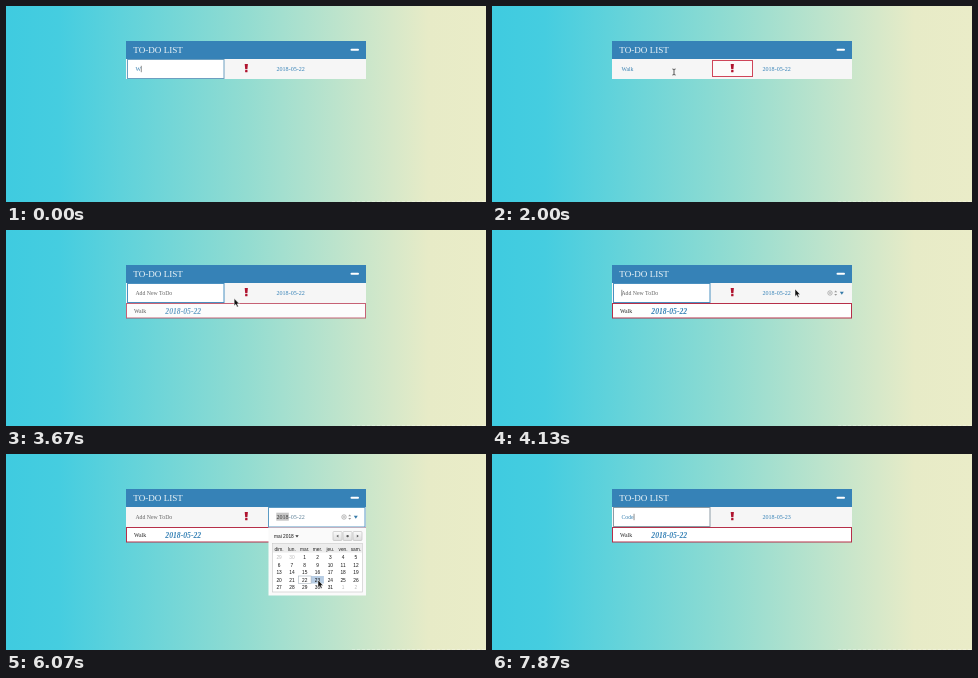
An HTML page for the animation above (8 s loop, 480 by 196 pixels).

```html
<!DOCTYPE html>
<html lang="en">
<head>
<meta charset="utf-8">
<title>To-do list</title>
<style>
html, body { margin: 0; width: 100%; height: 100%; overflow: hidden; }
svg { display: block; width: 480px; height: 196px; }
text { font-family: "Liberation Serif", serif; }
#calendar text { font-family: "Liberation Sans", sans-serif; font-size: 4.8px; }
</style>
</head>
<body>
<svg viewBox="0 0 480 196">
  <defs>
    <linearGradient id="sky" gradientUnits="userSpaceOnUse" x1="0" x2="480" y1="0" y2="0">
      <stop offset="0" stop-color="#3fcbe0"/>
      <stop offset=".11" stop-color="#45cde0"/>
      <stop offset=".5" stop-color="#92dcd1"/>
      <stop offset=".88" stop-color="#e7ebc7"/>
      <stop offset="1" stop-color="#eaecc8"/>
    </linearGradient>
    <linearGradient id="key" x2="0" y2="1">
      <stop offset="0" stop-color="#fafafa"/>
      <stop offset="1" stop-color="#dedede"/>
    </linearGradient>
  </defs>
  <rect width="480" height="196" fill="url(#sky)"/>
  <path d="M346 195.5H480" stroke="#fff" stroke-opacity=".3" stroke-dasharray="3 2"/>

  <rect id="card" x="120" y="53" width="240" height="20" fill="#f6f6f6"/>
  <rect x="120" y="35" width="240" height="18" fill="#3682b7"/>
  <text x="127.3" y="47.4" font-size="9.1" fill="#edf5f8">TO-DO LIST</text>
  <path d="M345.5 43.7H352" stroke="#fff" stroke-width="2" stroke-linecap="round"/>

  <g id="item">
    <rect x="120.5" y="73.5" width="239" height="14.5" fill="#fff" stroke="#b62f49"/>
    <text x="128" y="83.2" font-size="5.8" fill="#222">Walk</text>
    <text x="159.3" y="83.9" font-size="7.7" font-weight="bold" font-style="italic" fill="#3580b5">2018-05-22</text>
  </g>

  <rect id="inputBox" x="121.5" y="53.5" width="96.5" height="19" fill="#fff" stroke="#6d9fc0"/>
  <text id="inputText" x="129.4" y="65" font-size="5.8"></text>
  <path id="caret" d="M0 59.8V66.2" stroke="#444" stroke-width=".6"/>

  <rect id="flagBox" x="220.5" y="54.5" width="40" height="16" fill="#fcfafa" stroke="#cf4559"/>
  <path d="M238.7 58h3.2l-.5 5.3h-2.2z" fill="#b0142f"/>
  <rect x="239.1" y="64" width="2.4" height="2.2" rx=".5" fill="#b0142f"/>

  <rect id="dateBox" x="262.5" y="53.5" width="96.5" height="19.5" fill="#fff" stroke="#5a9ac4"/>
  <rect id="yearMark" x="270.3" y="58.7" width="12.5" height="8" fill="#c6c6c6"/>
  <text x="270.5" y="65" font-size="6.07" fill="#3682b7"><tspan id="year">2018</tspan><tspan id="monthDay"></tspan></text>
  <g id="controls">
    <circle cx="338" cy="63" r="2.2" fill="none" stroke="#999" stroke-width=".7"/>
    <path d="M337.2 62.2l1.6 1.6m0-1.6l-1.6 1.6" stroke="#999" stroke-width=".6"/>
    <path d="M342.2 62.2l1.5-1.8 1.5 1.8zM342.2 63.9l1.5 1.8 1.5-1.8z" fill="#999"/>
    <path d="M347.8 61.7h4l-2 3z" fill="#367aa8"/>
  </g>

  <g id="calendar">
    <rect x="262.5" y="73.5" width="97.5" height="68" fill="#fafafa"/>
    <text x="268" y="84" fill="#111">mai 2018</text>
    <path d="M289.3 81.2h3.4l-1.7 2.2z" fill="#333"/>
    <g id="keys"></g>
    <rect x="266.5" y="89.5" width="90" height="48.5" fill="#fff" stroke="#ccc" stroke-width=".7"/>
    <rect x="267" y="90" width="89" height="8.6" fill="#ededed"/>
    <rect id="hover" width="12.8" height="7.5" fill="#b7cde4"/>
    <rect x="292.3" y="122" width="12.8" height="7.5" fill="none" stroke="#a9b4be" stroke-width=".6"/>
    <g id="days"></g>
  </g>

  <g id="pointer">
    <path id="arrow" d="M0 0V7.4L1.7 5.9 2.9 8.6 4.2 8 3 5.4H5.2Z" fill="#111" stroke="#fff" stroke-width=".5"/>
    <path id="beam" d="M-1.6 -3Q0 -3 0 -2V2Q0 3 -1.6 3M1.6 -3Q0 -3 0 -2M0 2Q0 3 1.6 3" fill="none" stroke="#333" stroke-width=".8"/>
  </g>
</svg>
<script>
const LOOP = 8000;
const $ = id => document.getElementById(id);
const show = (id, on) => $(id).setAttribute("display", on ? "inline" : "none");
const set = (id, name, value) => $(id).setAttribute(name, value);
const smooth = p => { p = Math.min(1, Math.max(0, p)); return p * p * (3 - 2 * p); };
const last = (list, t) => list.filter(e => e[0] <= t).pop();

function add(parent, tag, attrs, text = "") {
  const el = document.createElementNS("http://www.w3.org/2000/svg", tag);
  for (const k in attrs) el.setAttribute(k, attrs[k]);
  el.textContent = text;
  $(parent).append(el);
}

const cell = { x: 266.7, y: 99.5, w: 12.8, h: 7.5 };

function buildCalendar() {
  const label = (col, y, text, fill) => add("days", "text",
    { x: cell.x + (col + .5) * cell.w, y, fill, "text-anchor": "middle" }, text);
  "dim. lun. mar. mer. jeu. ven. sam.".split(" ").forEach((d, i) => label(i, 96.6, d, "#222"));
  for (let i = 0; i < 35; i++) {
    const day = i - 1;
    const shown = day < 1 ? day + 30 : day > 31 ? day - 31 : day;
    label(i % 7, 105 + Math.floor(i / 7) * cell.h, shown, day < 1 || day > 31 ? "#bbb" : "#111");
  }
  for (let i = 0; i < 3; i++) {
    const x = 327 + i * 10;
    add("keys", "rect", { x, y: 77.5, width: 9, height: 9, rx: 1, fill: "url(#key)", stroke: "#bbb", "stroke-width": .6 });
    const mark = ["M5.4 80.7v2.8l-2-1.4z", "M3.4 82.1a1.2 1.2 0 1 1 2.4 0a1.2 1.2 0 1 1-2.4 0", "M3.8 80.7v2.8l2-1.4z"][i];
    add("keys", "path", { d: mark, transform: `translate(${x})`, fill: "#555" });
  }
}

// [time, text] as typed in the input
const typing = [[0, "W"], [100, "Wa"], [270, "Wal"], [330, "Walk"], [2670, ""],
  [7070, "C"], [7200, "Co"], [7330, "Cod"], [7470, "Code"]];
// [time, focused field]
const focus = [[0, "input"], [1130, "flag"], [2200, "input"], [4800, "date"], [6270, "input"]];
// [time, x, y] of the mouse
const path = [[600, 186, 67], [1050, 238, 62], [1670, 238, 62], [2000, 182, 66], [2200, 187, 66],
  [2900, 189, 67], [3200, 198, 73], [3530, 216, 70], [4130, 303, 59], [4650, 349, 63],
  [5270, 349, 63], [5950, 312, 126], [6270, 312, 126], [6670, 182, 65]];

function mouseAt(t) {
  const i = path.findIndex(p => p[0] > t);
  if (i < 0) return path[path.length - 1].slice(1);
  if (i === 0) return path[0].slice(1);
  const [a, b] = [path[i - 1], path[i]];
  const p = smooth((t - a[0]) / (b[0] - a[0]));
  return [a[1] + (b[1] - a[1]) * p, a[2] + (b[2] - a[2]) * p];
}

function render(t) {
  const [typedAt, typed] = last(typing, t);
  const [focusAt, field] = last(focus, t);
  const [mx, my] = mouseAt(t);
  const mouseOn = t >= 600 && t < 7070;
  const added = t >= 2670;

  set("card", "height", added ? 35 : 20);
  show("item", added);
  set("item", "opacity", smooth((t - 2670) / 1500));

  show("inputBox", field === "input");
  set("inputBox", "stroke", t > 7000 ? "#8c9ba5" : added ? "#4a90c0" : "#6d9fc0");
  $("inputText").textContent = typed || "Add New ToDo";
  set("inputText", "fill", typed ? "#3b82b2" : "#666");
  const width = typed ? $("inputText").getComputedTextLength() : 0;
  set("caret", "transform", `translate(${129.8 + width})`);
  show("caret", field === "input" && (t - Math.max(typedAt, focusAt)) % 1060 < 530);

  show("flagBox", field === "flag");

  const dateOn = field === "date";
  show("dateBox", dateOn);
  show("yearMark", dateOn);
  show("calendar", dateOn);
  set("year", "fill", dateOn ? "#333" : "#3682b7");
  set("monthDay", "fill", dateOn ? "#5f8299" : "#3682b7");
  $("monthDay").textContent = t < 6270 ? "-05-22" : "-05-23";
  show("controls", dateOn || (mouseOn && mx > 262 && mx < 359 && my > 53 && my < 73));

  let col = Math.floor((mx - cell.x) / cell.w), row = Math.floor((my - cell.y) / cell.h);
  if (col < 0 || col > 6 || row < 0 || row > 4) [col, row] = [2, 3];
  set("hover", "x", cell.x + col * cell.w);
  set("hover", "y", cell.y + row * cell.h);

  const overInput = mx < 219;
  show("pointer", mouseOn);
  show("beam", overInput);
  show("arrow", !overInput);
  set("pointer", "transform", `translate(${mx} ${my})`);
}

buildCalendar();
const start = performance.now();
function tick() {
  render((performance.now() - start) % LOOP);
  requestAnimationFrame(tick);
}
tick();
</script>
</body>
</html>
```
